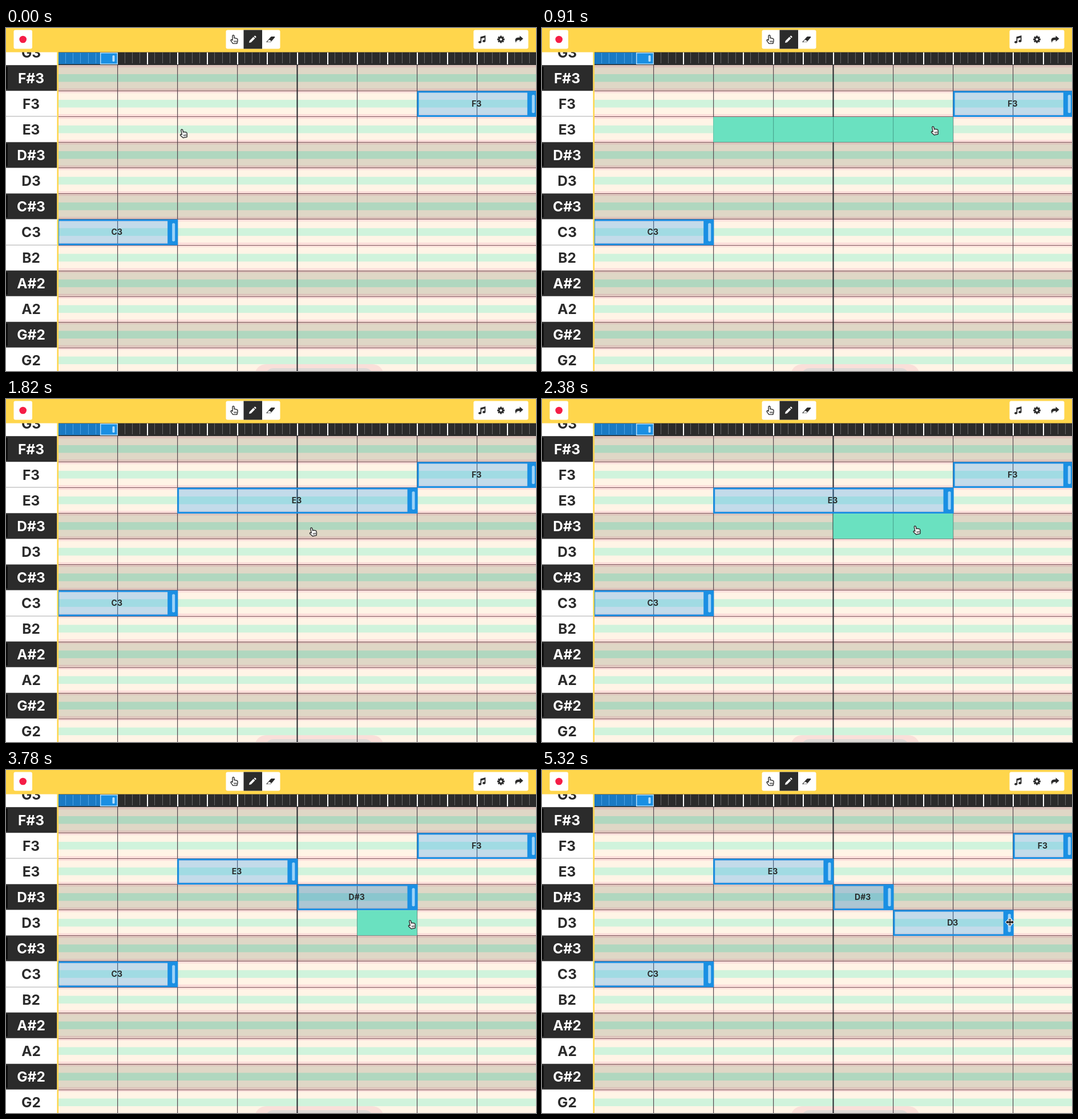
Recreate the animation shown at these times as an HTML page with a canvas. Size 929 px wide and 602 px high, loop 5390 ms.

```html
<!DOCTYPE html>
<html>
<head>
<meta charset="utf-8">
<style>
html, body { margin: 0; width: 100%; height: 100%; overflow: hidden; }
canvas { display: block; }
</style>
</head>
<body>
<canvas id="stage" width="929" height="602"></canvas>
<script>
const ctx = document.getElementById('stage').getContext('2d');
const LOOP = 5390, STEP = 70;
const LEFT = 90, COL = 105.1, TOP = 65.2, ROW = 45.05;
const INK = '#2b2b2b', BLUE = '#1a8fe3', PALE = '#9dd3f8', YELLOW = '#ffd64c';
const KEYS = ['F#3', 'F3', 'E3', 'D#3', 'D3', 'C#3', 'C3', 'B2', 'A#2', 'A2', 'G#2', 'G2'];

const colX = c => LEFT + COL * c;
const rowY = r => TOP + ROW * r;

// cursor path: time, x, y
const PATH = [
  [0, 311, 185], [280, 311, 185], [910, 688, 180], [1120, 697, 180],
  [1820, 538, 233], [1960, 530, 230], [2520, 680, 230], [2800, 687, 230],
  [3300, 640, 271], [3430, 640, 271], [3780, 711, 271], [4000, 711, 271],
  [4300, 711, 266], [4550, 714, 266], [4690, 714, 266], [5180, 820, 267], [LOOP, 820, 267]
];
// drawing gestures: press time, release time, row, first column
const DRAWS = [[280, 1120, 2, 2], [1960, 2590, 3, 4], [3430, 3990, 4, 5]];

const HAND = new Path2D('M-3.5 1.5V-6a1.5 1.5 0 0 1 3 0V-2.2q1.2-.9 2.2.3q1.3-.6 2 .6q1.8-.2 1.8 1.6V3l-1.2 4.4H-2.6L-6.2 2.6q-.7-1.5.6-2.1q1-.2 2.1 1z');
const FINGERS = new Path2D('M-.5 2.2v3M1.4 2.2v3M3.3 2.2v3');
const ARROWS_H = 'M-7 0l3.4-3.2v2.2h7.2v-2.2l3.4 3.2l-3.4 3.2v-2.2h-7.2v2.2z';
const MOVE = new Path2D('M0-6.5l2.6 2.8h-1.7v2.8h2.8v-1.7l2.8 2.6l-2.8 2.6v-1.7h-2.8v2.8h1.7l-2.6 2.8l-2.6-2.8h1.7v-2.8h-2.8v1.7l-2.8-2.6l2.8-2.6v1.7h2.8v-2.8h-1.7z');
const RESIZE = new Path2D(ARROWS_H + 'M-1.8-6h1.3v12h-1.3zM.5-6h1.3v12h-1.3z');
const PENCIL = new Path2D('M-6 6l.8-3.6l6.9-6.9l2.8 2.8l-6.9 6.9zM2.6-5.3l1-1q.7-.6 1.4 0l1.3 1.3q.6.7 0 1.4l-1 1z');
const ERASER = new Path2D('M-7.5 4.2L.2-4.6q.5-.5 1.2-.5H6.5q1.5.2.7 1.5L.3 4.5q-.5.6-1.2.6h-6q-1.2 0-.6-.9z');
const NOTES = new Path2D('M-3-4.6L6-7V3.2a2.6 2 0 1 1-1.8-2.2V-3L-1.2-1.5V5a2.6 2 0 1 1-1.8-2.1z');
const SHARE = new Path2D('M1.5-6.5L7.5-1.2L1.5 4V1Q-5 .6-5 6Q-10-3.6 1.5-3.6z');

function box(x, y, w, h, color) {
  ctx.fillStyle = color;
  ctx.fillRect(x, y, w, h);
}

function roundBox(x, y, w, h, r, color) {
  ctx.fillStyle = color;
  ctx.beginPath();
  ctx.roundRect(x, y, w, h, r);
  ctx.fill();
}

function disc(x, y, r, color) {
  ctx.fillStyle = color;
  ctx.beginPath();
  ctx.arc(x, y, r, 0, 7);
  ctx.fill();
}

function label(text, x, y, size, color) {
  ctx.font = `700 ${size}px Inter, sans-serif`;
  ctx.textAlign = 'center';
  ctx.fillStyle = color;
  ctx.fillText(text, x, y + size * .365);
}

function at(x, y, paint, angle = 0) {
  ctx.save();
  ctx.translate(x, y);
  ctx.rotate(angle);
  paint();
  ctx.restore();
}

function icon(path, x, y, color) {
  at(x, y, () => { ctx.fillStyle = color; ctx.fill(path); });
}

function hand(x, y, angle) {
  at(x, y, () => {
    ctx.fillStyle = '#fff';
    ctx.strokeStyle = INK;
    ctx.lineJoin = 'round';
    ctx.lineWidth = 1.4;
    ctx.fill(HAND);
    ctx.stroke(HAND);
    ctx.lineWidth = 1;
    ctx.stroke(FINGERS);
  }, angle);
}

function drawGrid() {
  KEYS.forEach((key, r) => {
    const y = rowY(r), dark = key.includes('#');
    box(LEFT, y, 839, ROW + 1, dark ? '#dfd7c6' : '#fff4e6');
    const edge = dark ? '#dcc3bb' : '#fbdeda';
    box(LEFT, y, 839, 4, edge);
    box(LEFT, y + 41, 839, 4.5, edge);
    box(LEFT, y + 15.8, 839, 13.5, dark ? '#b0d7bf' : '#d0f3dc');
  });
  roundBox(436, 590, 226, 40, 24, '#fadfd9');
  roundBox(454, 597, 190, 30, 16, '#dedad7');
  for (let r = 1; r < KEYS.length; r++) box(LEFT, Math.round(rowY(r)), 839, 1, '#80565d');
  for (let c = 1; c < 8; c++) {
    const bar = c === 4;
    box(Math.floor(colX(c)) - (bar ? .5 : 0), 65, bar ? 2 : 1.2, 537, bar ? '#25252a' : '#58494f');
  }
}

function drawNote(r, from, to) {
  const x = colX(from), y = rowY(r), w = colX(to) - x;
  box(x, y + 1, w, 44, 'rgba(33,150,243,.27)');
  ctx.strokeStyle = BLUE;
  ctx.lineWidth = 3;
  ctx.strokeRect(x + 1.5, y + 1.7, w - 2, 42.6);
  box(x + w - 17, y + .5, 17.5, 45, BLUE);
  roundBox(x + w - 9, y + 7, 5, 32, 2, PALE);
  label(KEYS[r], x + w / 2 - .8, y + 22.6, 14, INK);
}

function drawRuler() {
  box(LEFT, 42, 839, 23, INK);
  for (let i = 9; i < 64; i++) {
    const big = i % 4 === 0;
    box(Math.round(LEFT + i * COL / 8 - .4), 43, big ? 2 : 1, big ? 21 : 19, big ? '#fff' : '#666');
  }
  box(92, 43, 104, 20.5, '#1a7ac4');
  for (let i = 1; i < 6; i++) box(Math.round(LEFT + 1 + i * COL / 8), 44, 1, 18, '#4ba3e6');
  box(165, 43, 31, 21, BLUE);
  ctx.strokeStyle = '#b5defa';
  ctx.lineWidth = 1.5;
  ctx.strokeRect(165.7, 43.7, 29.6, 19.6);
  roundBox(186.5, 48, 4, 11, 1.5, '#b5defa');
}

function drawKeys() {
  box(0, 42, 90, 560, '#fff');
  label('G3', 44, rowY(-1) + 22.7, 24.5, INK);
  KEYS.forEach((key, r) => {
    const y = rowY(r), dark = key.includes('#');
    if (dark) {
      box(0, y, 89.5, ROW, INK);
      box(0, y + 3, 3, ROW - 6, '#0c0c0c');
    } else if (r && !KEYS[r - 1].includes('#')) {
      box(0, Math.round(y) - .5, 89.5, 1, '#aaa');
    }
    label(key, 44, y + 22.7, 24.5, dark ? '#fff' : INK);
  });
  box(89.5, 42, 2.5, 560, YELLOW);
}

function drawToolbar() {
  box(0, 0, 929, 42.5, YELLOW);
  for (const [x, w] of [[13.5, 32.5], [385.5, 95], [819.5, 96]]) roundBox(x, 3.5, w, 33, 3, '#fff');
  disc(29.7, 20, 6.3, '#f51d46');
  box(416.5, 3.5, 32.5, 33, INK);
  hand(400.5, 20, 0);
  icon(PENCIL, 432, 20, '#fff');
  icon(ERASER, 464, 20, INK);
  at(464, 20, () => {
    ctx.fillStyle = '#fff';
    ctx.fill(new Path2D('M-5.8 3.8l2.8-3.3l4 2.2l-1.5 1.7h-5z'));
  });
  icon(NOTES, 834.5, 20, INK);
  at(867.5, 20, () => {
    for (let i = 0; i < 4; i++) {
      ctx.rotate(Math.PI / 4);
      box(-1.5, -6.4, 3, 12.8, INK);
    }
    disc(0, 0, 4.7, INK);
    disc(0, 0, 2.1, '#fff');
  });
  icon(SHARE, 899, 20, INK);
}

function cursorAt(t) {
  const i = PATH.findIndex(p => p[0] > t);
  const [t0, x0, y0] = PATH[i - 1], [t1, x1, y1] = PATH[i];
  let k = (t - t0) / (t1 - t0);
  k = k * k * (3 - 2 * k);
  return [x0 + (x1 - x0) * k, y0 + (y1 - y0) * k];
}

// notes as row, first column, end column; a finished note trims its neighbour
function notesAt(t, x) {
  const done = DRAWS.map(d => t >= d[1]);
  const end = t >= 4690 ? Math.max(6, Math.round((x - LEFT) / COL)) : 6;
  const notes = [[6, 0, 2], [1, end, 8]];
  if (done[0]) notes.push([2, 2, done[1] ? 4 : 6]);
  if (done[1]) notes.push([3, 4, done[2] ? 5 : 6]);
  if (done[2]) notes.push([4, 5, end]);
  return notes;
}

function drawCursor(x, y, notes, t, drawing) {
  const over = !drawing && notes.find(([r, a, b]) =>
    x > colX(a) && x < colX(b) && y > rowY(r) && y < rowY(r + 1));
  const resizing = t >= 4690 || over && x > colX(over[2]) - 17;
  if (!over && !resizing) return hand(x + .5, y, -.2);
  const shape = resizing ? RESIZE : MOVE;
  at(x, y, () => {
    ctx.strokeStyle = '#fff';
    ctx.lineWidth = 2;
    ctx.stroke(shape);
    ctx.fillStyle = '#111';
    ctx.fill(shape);
  });
}

function draw(t) {
  const [x, y] = cursorAt(t), notes = notesAt(t, x);
  const drawing = DRAWS.find(d => t >= d[0] && t < d[1]);
  drawGrid();
  notes.forEach(n => drawNote(...n));
  if (drawing) {
    const [, , r, from] = drawing, to = Math.ceil((x - LEFT) / COL);
    box(colX(from), rowY(r) + .8, colX(to) - colX(from), ROW - .8, '#6ae1c0');
    for (let c = from + 1; c < to; c++) box(Math.floor(colX(c)), rowY(r) + .8, 1.2, ROW - .8, '#4aa791');
  }
  drawRuler();
  drawKeys();
  drawToolbar();
  drawCursor(x, y, notes, t, drawing);
}

function tick() {
  draw(Math.floor(performance.now() % LOOP / STEP) * STEP);
  requestAnimationFrame(tick);
}
tick();
</script>
</body>
</html>
```
